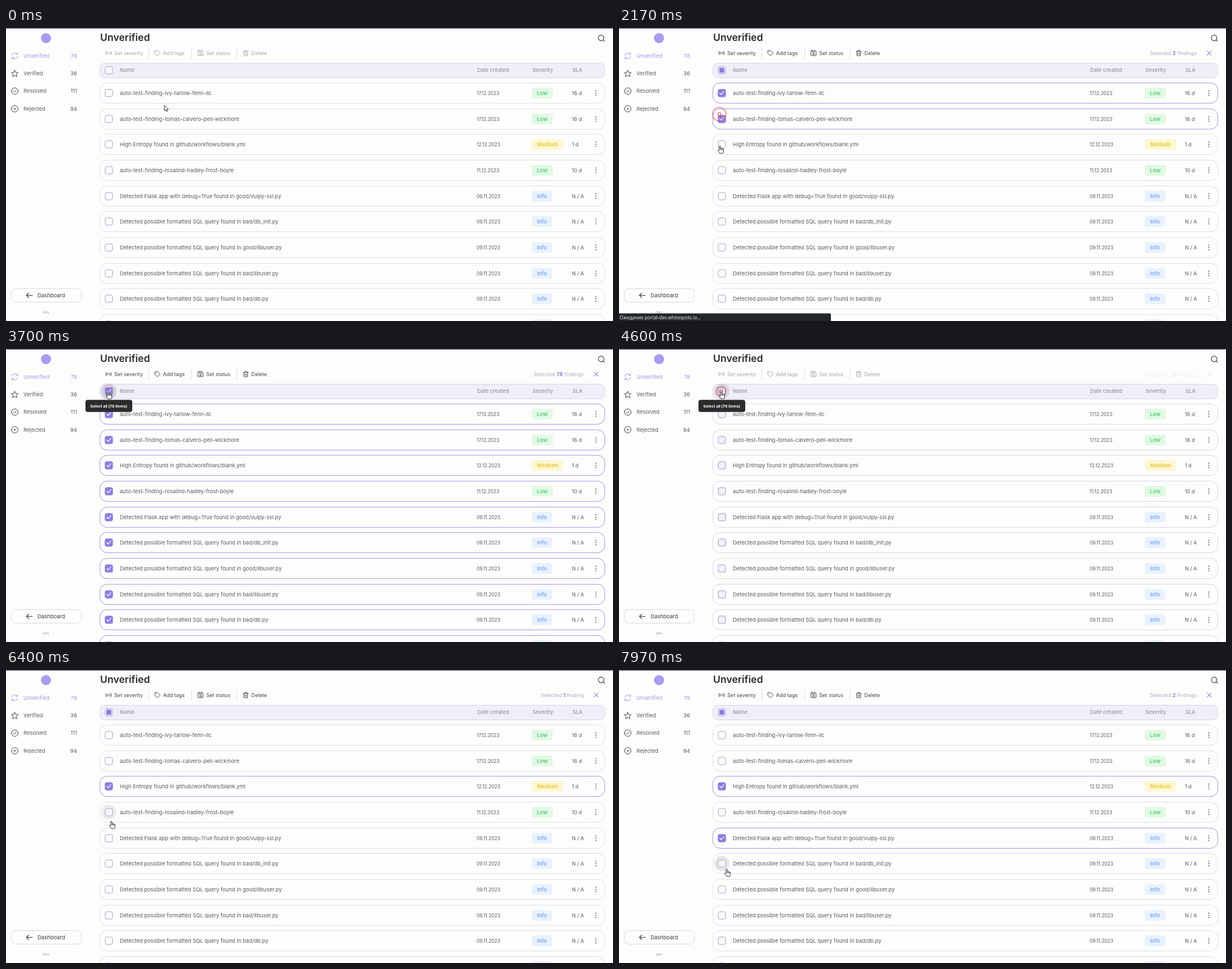
Animation, 1077 px wide and 520 px high, one loop 8000 ms. Source, as an HTML page:

```html
<!DOCTYPE html>
<html lang="en">
<head>
<meta charset="utf-8">
<title>Findings</title>
<style>
  html, body { margin: 0; width: 100%; height: 100%; overflow: hidden; background: #fdfdfc; }
  svg { display: block; width: 100vw; height: 100vh; }
  text { font-family: Inter, "Open Sans", sans-serif; font-size: 9.45px; fill: #5a5a62; white-space: pre; }
  .title { font-size: 17.6px; font-weight: 600; fill: #2a2a32; }
  .head { font-size: 9.2px; font-weight: 600; fill: #a09eac; }
  .tool { font-size: 9.15px; fill: currentColor; }
  .num { font-size: 8.4px; }
  .sla { font-size: 9.1px; }
  .badge { font-size: 9.4px; font-weight: 700; }
  .tip { font-size: 6.85px; font-weight: 700; fill: #fff; }
  .wait { font: 8.3px "Open Sans", "Noto Sans", sans-serif; fill: #f2f2f2; }
  .icon { fill: none; stroke: currentColor; stroke-linecap: round; stroke-linejoin: round; }
</style>
</head>
<body>
<svg id="stage" viewBox="0 0 1077 520" preserveAspectRatio="none"></svg>
<script>
const LOOP = 8000, FADE = 170, BOX_X = 182.5, VIOLET = '#8a7fe0';
const stage = document.getElementById('stage');
const rowY = i => Math.round(97 + i * 45.67) + 18.5;

const levels = {
  Low: [37, '#e1f9e4', '#66d284'],
  Medium: [56, '#fdf7d2', '#eccb45'],
  Info: [36, '#e8f2ff', '#8ab1f3']
};
const sql = 'Detected possible formatted SQL query found in ';
const rows = [
  ['auto-test-finding-ivy-tarlow-fenn-llc', '17.12.2023', 'Low', '16 d'],
  ['auto-test-finding-tomas-calvero-pell-wickmore', '17.12.2023', 'Low', '16 d'],
  ['High Entropy found in github/workflows/blank.yml', '12.12.2023', 'Medium', '1 d'],
  ['auto-test-finding-rosalind-hadley-frost-boyle', '11.12.2023', 'Low', '10 d'],
  ['Detected Flask app with debug=True found in good/vulpy-ssl.py', '09.11.2023', 'Info', 'N / A'],
  ...['bad/db_init.py', 'good/libuser.py', 'bad/libuser.py', 'bad/db.py', 'bad/api.py']
    .map(file => [sql + file, '09.11.2023', 'Info', 'N / A'])
];

// time, x, y of the pointer tip
const path = [
  [0, 281, 137], [270, 281, 138], [700, 215, 122], [1040, 182, 112], [1360, 181, 111],
  [1440, 179, 146], [1560, 178, 153], [1950, 178, 153], [2170, 179, 209], [2250, 180, 208],
  [2620, 180, 208], [2760, 181, 205], [2900, 183, 115], [3000, 185, 95], [3120, 182, 77],
  [3900, 181, 75], [4600, 181, 75], [5000, 181, 78], [5650, 183, 204], [5800, 182, 208],
  [6150, 182, 208], [6280, 185, 250], [6400, 187, 268], [6700, 183, 297], [7400, 183, 299],
  [7700, 188, 335], [7970, 191, 353], [8000, 191, 354]
];

// click time, selected rows, count
const all = rows.map((_, i) => i);
const states = [
  [-1000, [], 0], [1360, [0], 1], [1950, [0, 1], 2], [2620, [0, 1, 2], 3],
  [3450, all, 78], [4450, [], 0], [6000, [2], 1], [7300, [2, 4], 2]
];

const clamp = v => Math.max(0, Math.min(1, v));
const text = (x, y, s, cls = '', extra = '') => `<text x="${x}" y="${y}" class="${cls}" ${extra}>${s}</text>`;
const rect = (x, y, w, h, r, extra) => `<rect x="${x}" y="${y}" width="${w}" height="${h}" rx="${r}" ${extra}/>`;
const icon = (x, y, d, color = 'currentColor', width = 1) =>
  `<path class="icon" transform="translate(${x} ${y})" d="${d}" style="stroke:${color}" stroke-width="${width}"/>`;
const ring = r => `M${-r} 0a${r} ${r} 0 1 0 ${2 * r} 0a${r} ${r} 0 1 0 ${-2 * r} 0`;

function checkbox(id, y) {
  return `<circle id="halo${id}" cx="${BOX_X}" cy="${y}" r="13.5" fill="#000" opacity="0"/>`
    + rect(BOX_X - 6.5, y - 6.5, 13, 13, 3, 'fill="#fdfdfc" fill-opacity=".6" stroke="#a39dd8"')
    + `<g id="on${id}" opacity="0">` + rect(BOX_X - 7, y - 7, 14, 14, 3, `fill="${VIOLET}"`)
    + icon(BOX_X, y, 'M-3.6 0L-1 2.7L3.7-2.8', '#fff', 1.3) + '</g>';
}

function row([name, date, level, sla], i) {
  const y = rowY(i), [w, bg, ink] = levels[level];
  const frame = extra => rect(166.5, y - 18, 896, 36, 13, `fill="none" ${extra}`);
  return frame('stroke="#dfdde9"') + frame(`id="edge${i}" stroke="#a29ae4" opacity="0"`)
    + checkbox(i, y)
    + text(202, y + 3.3, name) + text(835, y + 3.1, date, 'num')
    + rect(933, y - 9.5, w, 19, 4, `fill="${bg}"`)
    + text(933 + w / 2, y + 3.4, level, 'badge', `text-anchor="middle" style="fill:${ink}"`)
    + text(1004, y + 3.3, sla, 'sla')
    + [-4, 0, 4].map(d => `<circle cx="1046.5" cy="${y + d}" r="1.05" fill="#5a5a62"/>`).join('');
}

function nav(y, label, count, d, color) {
  return icon(15.5, y, d, color || '#3a3a42')
    + text(31, y + 3.3, label, '', color ? `style="fill:${color}"` : '')
    + text(126, y + 3.3, count, '', `text-anchor="end" ${color ? `style="fill:${color}"` : ''}`);
}

const star = 'M0-6L1.8-2.1L6-1.7L2.9 1.2L3.8 5.4L0 3.2L-3.8 5.4L-2.9 1.2L-6-1.7L-1.8-2.1Z';
const tools = [
  [182, 'Set severity', 'M-.6 0h1.2M-2.2-2q-1.4 2 0 4M2.2-2q1.4 2 0 4M-4.2-3q-2 3 0 6M4.2-3q2 3 0 6'],
  [268.5, 'Add tags', 'M-4-4.3L1-4.3L4.8-.3Q5 .5 4.4 1L1 4.3Q.3 5-.5 4.3L-4.3.6ZM-1.6-1.7h.2'],
  [345.2, 'Set status', 'M-4.2-4.5h7l1.6 1.6v7.4h-8.6ZM-2.2-4.5v2.7h4v-2.7M-1.6 1.6a1.6 1.6 0 1 0 3.2 0a1.6 1.6 0 1 0-3.2 0'],
  [425.3, 'Delete', 'M-4.5-3h9M-1.6-3v-1.7h3.2v1.7M-3.6-3l.4 7.7h6.4l.4-7.7M-1.2-.5v3M1.2-.5v3']
];

stage.innerHTML =
  rect(0, 0, 1077, 520, 0, 'fill="#fdfdfc"') + rect(0, 0, 1077, 1, 0, 'fill="#3d4b5c"')
  + `<circle cx="71" cy="18" r="9" fill="#a99cf0"/>`
  + nav(49.5, 'Unverified', 78, 'M-5.3-1A5.4 5.4 0 0 1 4.6-2.8M5.3 1A5.4 5.4 0 0 1-4.6 2.8M5-5.5v2.8h-2.8M-5 5.5v-2.8h2.8', '#9f97e4')
  + nav(81, 'Verified', 36, star)
  + nav(112, 'Resolved', 111, ring(5.8) + 'M-2.5 0L-.6 1.8L2.6-1.7')
  + nav(143.3, 'Rejected', 94, ring(5.8) + 'M-1.8-1.8L1.8 1.8M1.8-1.8L-1.8 1.8')
  + rect(9.5, 462.5, 124, 24, 8, 'fill="none" stroke="#d8d6ec"')
  + icon(41.5, 474.5, 'M5.2 0H-5.2M-1.2-4L-5.2 0L-1.2 4', '#33333b', 1.1)
  + text(56, 477.8, 'Dashboard', '', 'style="fill:#3a3a42"')
  + text(71, 507, 'dev', '', 'text-anchor="middle" style="font-size:6.8px;fill:#a4a4ac"')
  + text(167, 23.2, 'Unverified', 'title')
  + icon(1056, 17.6, ring(5) + 'M3.6 3.6L6 6', '#33333b', 1.1)
  + '<g id="tools">' + tools.map(([x, label, d]) => icon(x, 44.5, d) + text(x + 10, 47.8, label, 'tool')).join('') + '</g>'
  + [253.5, 329.5, 409.5].map(x => `<path d="M${x} 35V55" stroke="#dedce8"/>`).join('')
  + '<g id="picked">' + text(1025, 47.8, '', 'tool', 'id="count" text-anchor="end" style="fill:#aeacc2"')
  + icon(1047.3, 44.5, 'M-3.6-3.6L3.6 3.6M3.6-3.6L-3.6 3.6', VIOLET, 1.1) + '</g>'
  + rect(166.5, 62.5, 896, 26, 9, 'fill="#f0eff8" stroke="#d6d3ec"')
  + checkbox('H', 75)
  + rect(BOX_X - 4.5, 70.5, 9, 9, 1, `id="some" fill="${VIOLET}"`)
  + text(202, 78.2, 'Name', 'head') + text(836, 78.2, 'Date created', 'head')
  + text(934, 78.2, 'Severity', 'head') + text(1005, 78.2, 'SLA', 'head')
  + rows.map(row).join('')
  + '<g id="tip">' + rect(141, 90.3, 83, 21.5, 4, 'fill="#2b2b2e"') + text(182.3, 103.5, 'Select all (78 items)', 'tip', 'text-anchor="middle"') + '</g>'
  + '<g id="bar">' + rect(-4, 506.5, 380, 18, 2, 'fill="#20282e"') + text(1, 517, 'Ожидание portal-dev.whitespots.io...', 'wait') + '</g>'
  + '<g id="click" fill="none" stroke="#e8404a" stroke-width="1.1"><circle id="outer"/><circle id="inner" r="2.8"/></g>'
  + '<path id="arrow" d="M0 0V10L2.3 8L3.9 11.3L5.4 10.6L3.9 7.4H7Z" fill="#fff" stroke="#1c1c1c" stroke-width=".9" stroke-linejoin="round"/>'
  + '<path id="hand" d="M-1.1 1Q0-.9 1.1 1V5Q2.2 4 3.1 5.1Q4.2 4.4 5 5.6Q6.4 5.2 6.6 6.8V9.6Q6.4 11.4 5.4 13.3H-.2Q-1.2 11-3.4 8.6Q-3.6 7-1.9 7.4L-1.1 8.3ZM1.1 5V7.6M3.1 5.2V7.7M5 5.7V7.8" fill="#fff" stroke="#1c1c1c" stroke-width=".9" stroke-linejoin="round"/>';

const el = {};
stage.querySelectorAll('[id]').forEach(node => el[node.id] = node);
const alpha = (id, v) => el[id].setAttribute('opacity', v);

function pointer(t) {
  t = Math.max(0, t);
  let k = 1;
  while (k < path.length - 1 && path[k][0] < t) k++;
  const [t0, x0, y0] = path[k - 1], [t1, x1, y1] = path[k];
  const p = clamp((t - t0) / (t1 - t0));
  return [x0 + (x1 - x0) * p, y0 + (y1 - y0) * p];
}

// hover highlight trails the pointer a little
const halo = (t, y) => [60, 100, 140, 180].reduce((sum, lag) => {
  const [px, py] = pointer(t - lag);
  return sum + (Math.hypot(px - BOX_X, py - y) < 12 ? 0.25 : 0);
}, 0);

function draw(t) {
  const k = states.findLastIndex(s => s[0] <= t);
  const [since, set, count] = states[k];
  const prev = states[Math.max(0, k - 1)];
  const age = t - since, left = clamp(1 - age / FADE);
  const busy = t > 1360 && t < 2400;

  rows.forEach((_, i) => {
    const v = set.includes(i) ? 1 : prev[1].includes(i) ? left : 0;
    alpha('on' + i, v);
    alpha('edge' + i, v);
    alpha('halo' + i, busy ? 0 : 0.09 * halo(t, rowY(i)));
  });
  alpha('haloH', 0.11 * halo(t, 75));
  alpha('onH', count === 78 ? 1 : prev[2] === 78 ? left : 0);
  alpha('some', count && count < 78 ? 1 : 0);

  const shown = count || prev[2];
  el.tools.style.color = count ? '#44444c' : '#a8a8b0';
  alpha('picked', count ? 1 : shown ? left : 0);
  el.count.innerHTML = `Selected <tspan style="fill:${VIOLET};font-weight:700">${shown}</tspan> finding${shown === 1 ? '' : 's'}`;

  alpha('tip', clamp((t - 3220) / 120) * clamp((5180 - t) / 120));
  alpha('bar', clamp((t - 1380) / 80) * clamp((2560 - t) / 160));

  const [cx, cy] = pointer(since);
  alpha('click', k && age < 260 ? clamp((260 - age) / 40) : 0);
  for (const id of ['outer', 'inner']) {
    el[id].setAttribute('cx', cx);
    el[id].setAttribute('cy', cy);
  }
  el.outer.setAttribute('r', Math.min(12, age * 0.055));
  alpha('inner', age > 110 ? 1 : 0);

  const [x, y] = pointer(t);
  const inRow = rows.some((_, i) => Math.abs(y - rowY(i)) < 18.3);
  const onHead = Math.abs(y - 75) < 13;
  for (const id of ['arrow', 'hand']) {
    el[id].setAttribute('transform', `translate(${x} ${y})`);
    alpha(id, (inRow || onHead) === (id === 'hand') ? 1 : 0);
  }
}

const start = performance.now();
function tick() {
  draw((performance.now() - start) % LOOP);
  requestAnimationFrame(tick);
}
tick();
</script>
</body>
</html>
```
